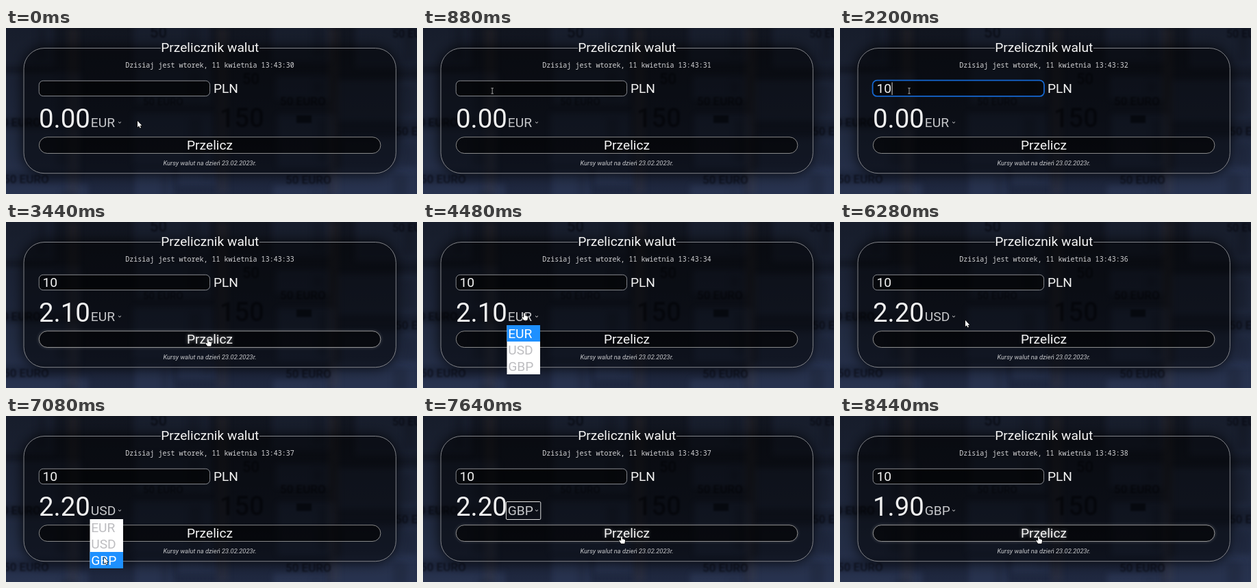
Write an HTML page with a canvas that moves like this. It is 600 px wide and 243 px high and loops after 8.88 s.

```html
<!DOCTYPE html>
<html lang="pl">
<head>
<meta charset="utf-8">
<title>Przelicznik walut</title>
<style>
html, body { margin: 0; width: 100%; height: 100%; overflow: hidden; background: #10141f; }
canvas { display: block; width: 600px; height: 243px; }
</style>
</head>
<body>
<canvas id="stage"></canvas>
<script>
const W = 600, H = 243, LOOP = 8880;
const SANS = 'Roboto, sans-serif';
const MONO = '"Noto Sans Mono", monospace';
const CODES = ['EUR', 'USD', 'GBP'];
const dpr = window.devicePixelRatio || 1;

// Pointer track: start time, end time, destination
const START = [192, 136];
const MOVES = [
  [120, 900, 101, 92],
  [2220, 2840, 295, 171],
  [3560, 4100, 148, 133],
  [4520, 4800, 150, 187],
  [5000, 5420, 277, 172],
  [5960, 6440, 150, 134],
  [6640, 7040, 143, 207],
  [7240, 7640, 290, 176]
];
// Value tables: [time, value], the last one reached applies
const AMOUNT = [[0, ''], [1200, '1'], [1800, '10']];
const RESULT = [[0, '0.00'], [3160, '2.10'], [5720, '2.20'], [7840, '1.90']];
const CURRENCY = [[0, 0], [4960, 1], [7160, 2]];
const FOCUS = [[0, ''], [960, 'input'], [3040, ''], [4200, 'list'], [4960, 'select'],
  [5640, ''], [6560, 'list'], [7160, 'select'], [7760, '']];
const CARET = [[0, 0], [960, 960], [1200, 1200], [1800, 1800]];

function newCanvas(el) {
  el.width = W * dpr;
  el.height = H * dpr;
  const c = el.getContext('2d');
  c.scale(dpr, dpr);
  return c;
}

const ctx = newCanvas(document.getElementById('stage'));
const backdrop = document.createElement('canvas');
paintBackdrop(newCanvas(backdrop));

function at(table, t) {
  let value = table[0][1];
  for (const [time, v] of table) if (t >= time) value = v;
  return value;
}

function pointer(t) {
  let [x, y] = START;
  for (const [from, to, tx, ty] of MOVES) {
    if (t <= from) break;
    const k = Math.min(1, (t - from) / (to - from));
    const e = k * k * (3 - 2 * k);
    x += (tx - x) * e;
    y += (ty - y) * e;
  }
  return [x, y];
}

function within([x, y], left, top, right, bottom) {
  return x > left && x < right && y > top && y < bottom;
}

function overButton(t) {
  const p = pointer(t);
  return at(FOCUS, t) !== 'list' && within(p, 48, 159, 547, 184);
}

function glowLevel(t) {
  let sum = 0;
  for (let i = 0; i < 10; i++) sum += overButton(t - i * 20) ? 1 : 0;
  return sum / 10;
}

function box(c, x, y, w, h, r) {
  c.beginPath();
  c.roundRect(x, y, w, h, r);
}

function label(str, x, y, size, color, align = 'left', font = SANS, style = '') {
  ctx.font = `${style} ${size}px ${font}`;
  ctx.textAlign = align;
  ctx.fillStyle = color;
  ctx.fillText(str, x, y);
}

function paintBackdrop(c) {
  const base = c.createLinearGradient(0, 0, 0, H);
  base.addColorStop(0, '#11151f');
  base.addColorStop(0.5, '#161c2b');
  base.addColorStop(1, '#1f2840');
  c.fillStyle = base;
  c.fillRect(0, 0, W, H);

  // Soft rows of banknotes
  c.filter = `blur(${4 * dpr}px)`;
  const notes = [
    [-10, -10, 80, 66], [186, -10, 112, 62], [388, -10, 86, 60], [510, -10, 100, 68],
    [-10, 66, 120, 66], [190, 56, 110, 56], [394, 70, 78, 34], [484, 76, 130, 60],
    [-10, 148, 118, 62], [186, 124, 116, 78], [396, 126, 84, 78], [488, 160, 130, 50],
    [-10, 228, 130, 30], [188, 206, 56, 50], [250, 206, 56, 24], [390, 230, 80, 20], [474, 206, 130, 50]
  ];
  for (const [x, y, w, h] of notes) {
    c.fillStyle = `rgba(70,88,130,${0.13 + 0.12 * Math.max(0, y) / H})`;
    c.fillRect(x, y, w, h);
    c.fillStyle = 'rgba(0,0,0,.12)';
    c.fillRect(x + w * 0.7, y + 8, w * 0.16, h - 16);
  }
  c.fillStyle = 'rgba(110,80,62,.12)';
  for (const x of [90, 308, 470]) c.fillRect(x, 0, 16, H);

  c.filter = `blur(${1.2 * dpr}px)`;
  c.fillStyle = 'rgba(3,5,12,.6)';
  const marks = [
    ['50 EURO', -16, 144, 17], ['50 EURO', -4, 227, 17], ['50 EURO', 400, 113, 17],
    ['50 EURO', 408, 228, 17], ['50 EURO', 568, 157, 17], ['50 EURO', 200, 113, 15],
    ['150', 312, 145, 38], ['50', 345, 82, 22], ['50 EURO', 564, 14, 16], ['50', 210, 14, 22]
  ];
  for (const [str, x, y, size] of marks) {
    c.font = `500 ${size}px ${SANS}`;
    c.fillText(str, x, y);
  }
  c.fillRect(424, 128, 22, 11);
  c.filter = 'none';

  // Panel with its shadow
  c.save();
  c.shadowColor = 'rgba(0,0,0,.9)';
  c.shadowBlur = 20 * dpr;
  c.beginPath();
  c.rect(0, 0, W, H);
  c.roundRect(26, 30, 543, 183, 30);
  c.clip('evenodd');
  c.fillStyle = '#000';
  box(c, 26, 30, 543, 183, 30);
  c.fill();
  c.restore();
  c.fillStyle = 'rgba(0,0,0,.5)';
  box(c, 26, 30, 543, 183, 30);
  c.fill();

  c.save();
  c.beginPath();
  c.rect(0, 0, W, H);
  c.rect(226, 24, 144, 12);
  c.clip('evenodd');
  c.strokeStyle = '#8f9197';
  c.lineWidth = 0.9;
  box(c, 26, 29.5, 543.3, 183.2, 30);
  c.stroke();
  c.restore();
}

function drawInput(t, focused) {
  const text = at(AMOUNT, t);
  ctx.fillStyle = 'rgba(0,0,0,.55)';
  box(ctx, 48, 77, 249.6, 22.6, 6);
  ctx.fill();
  ctx.strokeStyle = focused ? '#1567d0' : '#96989d';
  ctx.lineWidth = focused ? 1.8 : 0.9;
  if (focused) box(ctx, 47.6, 76.7, 250.4, 23.2, 6.5);
  else box(ctx, 48.2, 77.3, 249.4, 22.3, 6);
  ctx.stroke();
  label(text, 53.5, 94.8, 19.2, '#f2f2f2');
  if (focused && Math.floor((t - at(CARET, t)) / 500) % 2 === 0) {
    ctx.fillStyle = '#e8e8e8';
    ctx.fillRect(54 + text.length * 10.8, 79.5, 0.9, 18.5);
  }
}

function drawButton(level) {
  if (level > 0) {
    ctx.save();
    ctx.beginPath();
    ctx.rect(0, 0, W, H);
    ctx.roundRect(48, 159.6, 499, 24, 12);
    ctx.clip('evenodd');
    ctx.shadowColor = `rgba(255,255,255,${0.3 * level})`;
    ctx.shadowBlur = 5 * dpr;
    ctx.fillStyle = '#000';
    box(ctx, 48.3, 159.9, 498.4, 23.4, 11.7);
    ctx.fill();
    ctx.restore();
  }
  ctx.fillStyle = 'rgba(0,0,0,.55)';
  box(ctx, 48, 159.6, 499, 24, 12);
  ctx.fill();
  const v = Math.round(150 + 12 * level);
  ctx.strokeStyle = `rgb(${v},${v},${v})`;
  ctx.lineWidth = 0.9;
  box(ctx, 48.3, 159.7, 498.6, 23.8, 12);
  ctx.stroke();
  ctx.save();
  ctx.shadowColor = `rgba(255,255,255,${0.5 * level})`;
  ctx.shadowBlur = 5 * dpr;
  label('Przelicz', 297.5, 178, 19.2, '#f5f5f5', 'center');
  ctx.restore();
}

function drawSelect(t, focus) {
  label(CODES[at(CURRENCY, t)], 123.8, 145, 19.2, '#c6c7ca');
  ctx.strokeStyle = '#d5d5d5';
  ctx.lineWidth = 1;
  ctx.beginPath();
  ctx.moveTo(164, 137.4);
  ctx.lineTo(166, 139.3);
  ctx.lineTo(168, 137.4);
  ctx.stroke();
  if (focus === 'select') {
    ctx.strokeStyle = '#dedede';
    box(ctx, 121.4, 125.5, 50.4, 26, 1.5);
    ctx.stroke();
  }
}

function drawList(t, [x, y]) {
  let active = at(CURRENCY, t);
  if (x > 122 && x < 171 && y > 151) active = Math.min(2, Math.floor((y - 151) / 24));
  ctx.fillStyle = '#fff';
  ctx.fillRect(122.5, 151, 48.5, 72);
  CODES.forEach((code, i) => {
    const top = 151 + i * 24;
    if (i === active) {
      ctx.fillStyle = '#1e90ff';
      ctx.fillRect(122.5, top, 48.5, 24);
    }
    label(code, 124.2, top + 18.6, 19.2, i === active ? '#fff' : '#bdbdc0');
  });
}

const ARROW = new Path2D('M0 0V9.2L2.1 7.3L3.6 10.6L5 10L3.6 6.8H6.4Z');
const HAND = new Path2D('M-.9 .9Q0 -.7 .9 .9V4L3.9 4.7Q5.3 5.1 5.1 6.7L4.3 10.8H-.8L-3.6 6.9Q-3.4 5.5 -2 6L-.9 7Z');

function drawPointer(p, kind) {
  ctx.save();
  ctx.translate(p[0], p[1]);
  if (kind === 'beam') {
    ctx.strokeStyle = '#c4c4c4';
    ctx.lineWidth = 0.8;
    ctx.stroke(new Path2D('M-1.8 -4H1.8M0 -4V4M-1.8 4H1.8'));
  } else {
    const shape = kind === 'hand' ? HAND : ARROW;
    ctx.lineJoin = 'round';
    ctx.lineWidth = 1.2;
    ctx.strokeStyle = '#000';
    ctx.stroke(shape);
    ctx.fillStyle = '#fff';
    ctx.fill(shape);
  }
  ctx.restore();
}

function pointerKind(p, open) {
  if (within(p, 48, 77, 298, 100)) return 'beam';
  if (within(p, 122, 125, 172, 151)) return 'hand';
  if (!open && within(p, 48, 159, 547, 184)) return 'hand';
  return 'arrow';
}

function draw(t) {
  const p = pointer(t);
  const focus = at(FOCUS, t);
  const open = focus === 'list';
  const second = 30 + Math.floor((t + 120) / 1000);

  ctx.drawImage(backdrop, 0, 0, W, H);
  label('Przelicznik walut', 297.8, 35, 19.2, '#f5f5f5', 'center');
  label(`Dzisiaj jest wtorek, 11 kwietnia 13:43:${second}`, 297.5, 58.3, 10.03, '#d2d2d4', 'center', MONO);
  drawInput(t, focus === 'input');
  label('PLN', 302.9, 94.8, 19.2, '#f2f2f2');
  label(at(RESULT, t), 48, 145.5, 38.4, '#f0f0f0');
  drawSelect(t, focus);
  drawButton(glowLevel(t));
  label('Kursy walut na dzień 23.02.2023r.', 297.5, 201.2, 9.4, '#c6c7ca', 'center', SANS, 'italic');
  if (open) drawList(t, p);
  drawPointer(p, pointerKind(p, open));
}

const begin = performance.now();
function frame() {
  const t = (performance.now() - begin) % LOOP;
  draw(Math.floor(t / 40) * 40);
  requestAnimationFrame(frame);
}
frame();
</script>
</body>
</html>
```
